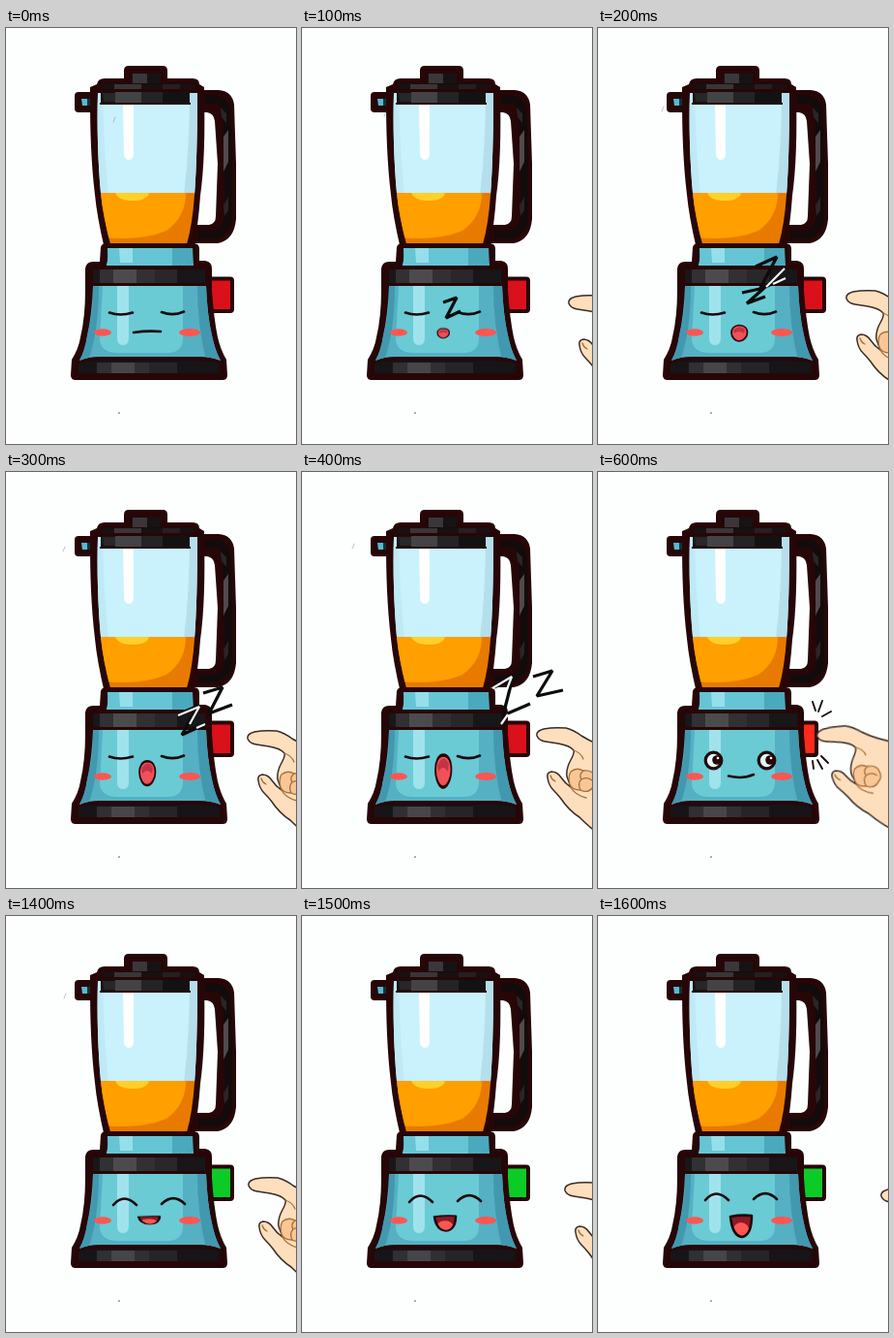
Write an HTML page that moves like this. It is 300x429 px and loops after 2.6 s.

```html
<!DOCTYPE html>
<html lang="en">
<head>
<meta charset="utf-8">
<title>Sleepy blender</title>
<style>
html, body { margin: 0; width: 100%; height: 100%; overflow: hidden; background: #fdffff; }
svg { display: block; width: 100vw; height: 100vh; }
.ink { fill: #270607; }
.line { fill: none; stroke: #1b0b0d; stroke-width: 2.6; stroke-linecap: round; stroke-linejoin: round; }
.thin { stroke-width: 1.9; }
.hand path { stroke: #3a2c26; stroke-width: 1.5; stroke-linecap: round; stroke-linejoin: round; }
.hand .fold { stroke: #a8703c; stroke-width: 1.3; }
.z path { fill: none; stroke: #0c0c0c; stroke-width: 3.3; stroke-linejoin: bevel; }
.z .glow { stroke: #effbff; stroke-width: 2.2; }

/* One loop is 2600 ms; 100 ms = 3.846% */
.a { animation: 2600ms step-end infinite; }
.hand { animation-name: reach; transform-origin: 300px 290px; }
.speck { animation-name: speck; }
.asleep { animation-name: asleep; }
.awake { animation-name: awake; }
.happy { animation-name: happy; }
.shut { animation-name: shut; }
.yawn { animation-name: yawn; transform-origin: 146px 315px; }
.grin { animation-name: grin; transform-origin: 148px 310px; }
.arcs { animation-name: arcs; }
.button { animation-name: press; }
.z1 { animation-name: z1; }
.z2 { animation-name: z2; }
.z3 { animation-name: z3; }
.z4 { animation-name: z4; }
.z5 { animation-name: z5; }

@keyframes reach {
  0% { transform: translate(67px, 24px); }
  3.846% { transform: translate(41px, 18px); }
  7.692% { transform: translate(22px, 13px); }
  11.538% { transform: translate(15px, 9px); }
  15.384% { transform: translate(8px, 6px); }
  19.23% { transform: none; }
  23.076% { transform: translateX(-6px) rotate(-6deg); }
  53.846% { transform: translate(16px, 12px); }
  57.692% { transform: translate(37px, 17px); }
  61.538%, 100% { transform: translate(58px, 23px); }
}
@keyframes speck { 0% { opacity: .5; } 23.076% { opacity: 0; } 53.846% { opacity: .5; } 57.692%, 100% { opacity: 0; } }
@keyframes asleep { 0% { opacity: 1; } 23.076%, 100% { opacity: 0; } }
@keyframes awake { 0% { opacity: 0; } 23.076% { opacity: 1; } 53.846%, 100% { opacity: 0; } }
@keyframes happy { 0% { opacity: 0; } 53.846%, 100% { opacity: 1; } }
@keyframes shut { 0% { opacity: 1; } 3.846%, 100% { opacity: 0; } }
@keyframes yawn {
  0% { transform: scale(0); }
  3.846% { transform: scale(.75, .6); }
  7.692% { transform: none; }
  11.538% { transform: translateY(-4px) scale(1, 1.5); }
  15.384% { transform: translateY(-6px) scale(1, 2); }
  19.23%, 100% { transform: none; }
}
@keyframes grin { 0% { transform: scaleY(.38); } 57.692% { transform: scaleY(.7); } 61.538%, 100% { transform: none; } }
@keyframes arcs { 0% { transform: translateY(5px); } 57.692% { transform: translateY(2px); } 61.538%, 100% { transform: none; } }
@keyframes press {
  0% { transform: none; fill: #da101a; }
  23.076% { transform: translateX(-8px); fill: #ff2a1c; }
  53.846%, 100% { transform: none; fill: #0ccb27; }
}
@keyframes z1 { 0% { opacity: 0; } 3.846% { opacity: 1; } 7.692%, 100% { opacity: 0; } }
@keyframes z2 { 0% { opacity: 0; } 7.692% { opacity: 1; } 11.538%, 100% { opacity: 0; } }
@keyframes z3 { 0% { opacity: 0; } 11.538% { opacity: 1; } 15.384%, 100% { opacity: 0; } }
@keyframes z4 { 0% { opacity: 0; } 15.384% { opacity: 1; } 19.23%, 100% { opacity: 0; } }
@keyframes z5 { 0% { opacity: 0; } 19.23% { opacity: 1; } 23.076%, 100% { opacity: 0; } }
</style>
</head>
<body>
<svg viewBox="0 0 300 429" preserveAspectRatio="none">
  <defs>
    <clipPath id="glass"><path d="M95 67H198C198 110 197 145 195 172Q193 202 187 223H108Q100 192 98 170C95 138 94 100 95 67Z"/></clipPath>
    <clipPath id="body"><path d="M90 266H207Q208 295 213 317Q216 332 222 343Q212 339 200 339H97Q85 339 76 343Q82 332 84 317Q89 295 90 266Z"/></clipPath>
    <clipPath id="mouth"><path d="M137 310Q148 308 159 309Q159 329 149 331Q139 330 137 310Z"/></clipPath>
  </defs>
  <rect width="300" height="429" fill="#fdffff"/>
  <circle cx="117" cy="397" r=".8" fill="#444"/>

  <!-- button -->
  <g class="a button"><rect x="206" y="258.500" width="28" height="33.500" rx="2" stroke="#270607" stroke-width="4"/></g>

  <!-- handle -->
  <path class="ink" fill-rule="evenodd" d="M198 64H220Q234 65 236 79L238 140V197Q236 219 219 222H190L194 203H210Q217 202 217 194L219 140L216 96Q215 88 208 87H200Z"/>
  <path d="M206 74H218Q227 76 228 87L230 140V196Q228 210 216 213H199" fill="none" stroke="#120b0c" stroke-width="8"/>
  <path d="M225 112L230 105V138L225 148Z" fill="#504a4c"/>
  <path d="M222 82L228 88V98L223 92ZM225 183L230 174V188L226 194Z" fill="#2b2527"/>

  <!-- spout, lid and jug -->
  <rect class="ink" x="71" y="66" width="26" height="21" rx="4"/>
  <path d="M78 73H84V80H79Z" fill="#56bad0"/><path d="M84 73H89V80H84Z" fill="#13333d"/>
  <path class="ink" d="M122 44Q122 39 127 39H162Q167 39 167 44V52H193Q200 52 200 58L205 61V66C206 110 205 145 201 173Q199 202 194 228H102Q94 194 92 172C88 138 87 105 87 72V61L94 58Q95 52 102 52H122Z"/>
  <path d="M130 47H160V57H130Z" fill="#151315"/><path d="M131 47H146V57H131Z" fill="#39373a"/>
  <path d="M99 58H195V63H99Z" fill="#171112"/><path d="M112 58H140V63H112Z" fill="#393537"/><path d="M162 58H180V63H162Z" fill="#242022"/>
  <g clip-path="url(#glass)">
    <rect x="90" y="66" width="110" height="106" fill="#c9f2fc"/>
    <path d="M90 66H100Q101 125 106 172H90Z" fill="#bfeaf5"/>
    <path d="M190 66H200V172H184Q190 122 190 66Z" fill="#b5dfeb"/>
    <path d="M121 77H132V129Q132 136 127 136Q122 136 122 129Z" fill="#fff"/>
    <rect x="90" y="170" width="110" height="56" fill="#e87a00"/>
    <path d="M90 170H186Q186 195 166 209Q140 220 100 216Z" fill="#ff9f00"/>
    <path d="M113 170H148Q146 178 131 178Q116 178 113 170Z" fill="#ffd02a"/>
  </g>
  <path d="M98 66H190V77H98Z" fill="#131213"/>
  <path d="M100 67H113V76H101Z" fill="#282628"/><path d="M113 66H140V77H113Z" fill="#434244"/><path d="M140 66H162V77H140Z" fill="#242325"/>
  <path d="M97 78H191" stroke="#270607" stroke-width="2"/>

  <!-- collar and base -->
  <path class="ink" d="M98 226Q99 222 104 222H194Q200 222 200 228V240H206Q213 241 213 248V270Q215 300 219 319Q222 332 228 342L229 358Q229 363 224 363H72Q67 363 67 358L68 342Q75 331 77 319Q82 298 82 270V248Q83 241 90 241H97Z"/>
  <path d="M105 227H193L194 245H104Q106 238 105 227Z" fill="#4ba9bd"/>
  <path d="M105 227H172V245H104Q106 238 105 227Z" fill="#66c5d5"/><path d="M117 227H131V242H118Z" fill="#95dfea"/>
  <path d="M90 249H206V263H90Z" fill="#171618"/>
  <path d="M97 249H111V263H97ZM123 249H154V263H119Z" fill="#313032"/><path d="M111 249H135V263H111Z" fill="#4b4b4d"/><path d="M154 249H177V263H154Z" fill="#282729"/>
  <g clip-path="url(#body)">
    <rect x="70" y="264" width="155" height="82" fill="#55b0c3"/>
    <path d="M70 346Q91 316 90 266H96Q96 315 84 346ZM198 266H208L224 346H208Q198 310 198 266Z" fill="#4298ae"/>
    <path d="M100 266H183V321Q182 335 167 335H113Q98 334 97 321Z" fill="#6acbd5"/>
    <path d="M115 266H127V320Q127 327 121 327Q115 327 115 320Z" fill="#a0e3ed"/>
  </g>
  <path d="M75 346Q86 343 98 343H200Q212 343 221 346V356H75Z" fill="#161416"/>
  <path d="M94 345H109V356H94ZM133 345H148V356H133Z" fill="#302f31"/><path d="M109 345H133V356H109Z" fill="#464547"/><path d="M148 345H177V356H148Z" fill="#252426"/>

  <!-- face -->
  <g fill="#ff5552"><ellipse cx="100" cy="314" rx="9" ry="3.700"/><ellipse cx="190" cy="314" rx="11" ry="3.900"/></g>
  <g class="a asleep">
    <path class="line" d="M107 293.500Q118 297.500 131 293.500M161 293Q173 297.500 184 292.500"/>
    <path class="line a shut" d="M132 314Q146 312 160 313"/>
    <g class="a yawn">
      <path d="M146 306.500C152 306.500 154.500 310 154.500 314C154.500 319 150 323 146 323C142 323 138 319 138 314C138 310 141 306.500 146 306.500Z" fill="#f05058" stroke="#270607" stroke-width="1.700"/>
      <path d="M140 312Q146 305 152 311L151 315Q146 311 141 315Z" fill="#c23443"/>
    </g>
  </g>
  <g class="a awake">
    <g fill="#e4f8f8" stroke="#210b0d" stroke-width="3.300"><circle cx="119.500" cy="297.500" r="8.300"/><circle cx="174.500" cy="297.500" r="8.300"/></g>
    <g class="ink"><circle cx="123" cy="297" r="4.800"/><circle cx="178" cy="297" r="4.800"/></g>
    <g fill="#fff"><circle cx="124" cy="295" r="1.300"/><circle cx="179" cy="295" r="1.300"/></g>
    <path class="line" d="M135 313.500Q150 317 161 312"/>
    <path class="line thin" d="M222 237L225 246M232 236L228 247M241 247L232 252M222 298L223 306M227 297L232 306M231 293L238 300"/>
  </g>
  <g class="a happy">
    <g class="a arcs"><path class="line" d="M111 293Q122 280 135 293M161 292Q173 280 185 292"/></g>
    <g class="a grin">
      <g clip-path="url(#mouth)"><rect x="135" y="306" width="26" height="27" fill="#8f1823"/><ellipse cx="148" cy="326" rx="9" ry="10" fill="#fa5753"/></g>
      <path class="line" d="M137 310Q148 308 159 309Q159 329 149 331Q139 330 137 310Z"/>
    </g>
  </g>

  <!-- snores -->
  <g class="z">
    <g class="a z1">
      <path d="M146 283L160 278L149 299L164 292"/>
    </g>
    <g class="a z2">
      <path d="M163 246L185 236L167 270L190 259M149 273L172 268L154 284L173 277"/>
      <path class="glow" d="M174 267L193 248M181 264L194 258"/>
    </g>
    <g class="a z3">
      <path d="M178 250L199 241L182 271L206 260M204 228L224 222L210 249L234 240"/>
      <path class="glow" d="M178 251L200 242L190 260M197 264L206 260"/>
    </g>
    <g class="a z4">
      <path d="M199 222L218 212L208 251L236 239M239 211L259 205L243 231L270 225"/>
      <path class="glow" d="M197 223L217 211L212 224M206 260L213 250"/>
    </g>
    <g class="a z5">
      <path d="M238 211L259 205L243 231L270 223M273 223L287 218L275 241L290 235"/>
    </g>
  </g>

  <!-- hand -->
  <g class="a hand">
    <path fill="#fddfbd" d="M320 282Q295 275 281 266Q273 260 265 258Q252 257 242 259Q234 261 235 266Q237 271 244 272L257 274Q269 276 273 281Q274 284 270 291Q265 300 266 308L270 319Q264 315 260 309Q256 303 250 303Q245 304 246 309Q247 317 252 322Q257 327 260 331Q268 343 279 350Q290 361 300 368L320 384Z"/>
    <path class="fold" fill="#f8c795" d="M270 303Q276 298 283 302Q293 301 295 308Q298 314 293 319Q288 326 280 322Q271 322 269 316Q267 308 270 303Z"/>
    <path class="fold" fill="none" d="M283 302Q278 306 281 311Q277 315 280 322M281 311Q287 308 292 312M273 281Q281 284 283 290M270 319Q274 327 286 330M249 307Q250 311 254 313"/>
    <path class="a speck" fill="none" style="stroke-width:.9;stroke:#778" d="M44 73L46 68"/>
  </g>
</svg>
</body>
</html>
```
